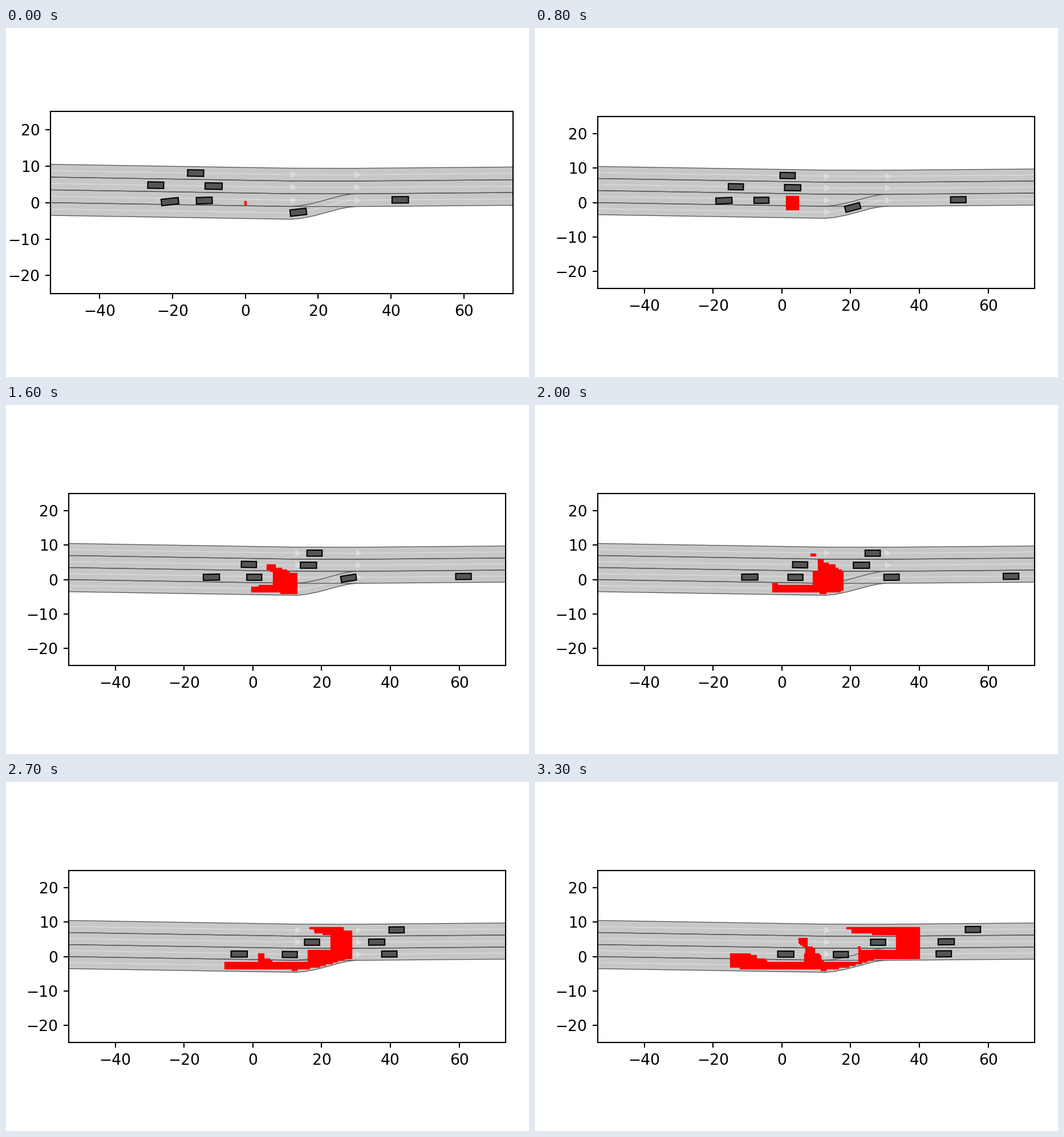
Recreate the animation shown at these times as a matplotlib script. Size 917 px wide and 611 px high, loop 3.4 s.

```python
from itertools import product

import numpy as np
import matplotlib.pyplot as plt
from matplotlib.animation import FuncAnimation
from matplotlib.collections import PolyCollection
from matplotlib.patches import Polygon

W, H, DPI = 917, 611, 128
FRAMES, INTERVAL = 34, 100
PX = 72 / DPI  # one pixel in points

plt.rcParams.update({
    "font.family": "DejaVu Sans", "font.size": 26.5 * PX,
    "axes.linewidth": 2.12 * PX,
    **{f"{a}tick.major.{p}": v * PX for a in "xy"
       for p, v in (("size", 9.28), ("pad", 9.28), ("width", 2.12))},
})

ROAD, EDGE, CENTER = "#c7c7c7", "#555555", "#dddddd"
LANE = 3.5

# Upper bound of the road, and lower bound of the merging lane
TOP_X, TOP_Y = [-53.55, 12.4, 30.1, 73.55], [10.5, 9.44, 9.41, 9.77]
LOW_X = [-53.55, 12.4, 15.2, 18.9, 25.9, 28.2, 30.1, 73.55]
LOW_Y = [-3.5, -4.56, -4.33, -3.6, -1.72, -1.27, -1.08, -0.73]


def road_top(x):
    return np.interp(x, TOP_X, TOP_Y)


def road_low(x):
    return np.interp(x, LOW_X, LOW_Y)


fig = plt.figure(figsize=(W / DPI, H / DPI), dpi=DPI, facecolor="white")
ax = fig.add_axes([0.1, 0.1, 0.8, 0.8])


def place_axes(left, right, half, middle=305.7):
    bottom = H - middle - half
    ax.set_position([left / W, bottom / H, (right - left) / W, 2 * half / H])


def lanelet(x, upper, lower, arrow):
    mid = (upper + lower) / 2
    outline = np.r_[np.c_[x, upper], np.c_[x, lower][::-1]]
    ax.add_patch(Polygon(outline, fc=ROAD, ec="none", zorder=1))
    for y in (upper, lower):
        ax.plot(x, y, color=EDGE, lw=1.3 * PX, zorder=1.2)
    ax.plot(x, mid, color=CENTER, lw=1.3 * PX, zorder=1.1)
    if arrow:
        tip = [(x[0], mid[0] + 0.87), (x[0] + 1.75, mid[0]), (x[0], mid[0] - 0.87)]
        ax.add_patch(Polygon(tip, fc=CENTER, ec="none", zorder=1.15))


def draw_road():
    for i in range(3):
        x = np.array(TOP_X[i:i + 2])
        for n in range(4 if i == 0 else 3):
            upper = road_top(x) - n * LANE
            lanelet(x, upper, upper - LANE, i > 0)
    x = np.array(LOW_X[1:7])
    lanelet(x, road_low(x) + LANE, road_low(x), True)


class Car:
    """Drives along a lane with constant acceleration, easing to its centre."""

    def __init__(self, length, lane, start, speed, acc, offset=0):
        self.lane, self.offset = lane, offset
        self.course = acc, speed, start
        self.half = length / 2
        self.box = np.array([(-1, -1), (1, -1), (1, 1), (-1, 1)]) * (self.half, 0.88)
        self.patch = ax.add_patch(Polygon(self.box, fc=EDGE, ec="black",
                                          lw=2.1 * PX, zorder=20))

    def pos(self, k):
        x = np.polyval(self.course, k)
        if self.lane == 3:  # the merging lane
            y = road_low(x) + LANE / 2
        else:
            y = road_top(x) - (self.lane + 0.5) * LANE
        return np.array([x, y + self.offset * np.exp(-k / 18)])

    def move(self, k):
        dx, dy = self.pos(k + 2) - self.pos(k - 2)
        c, s = np.array([dx, dy]) / np.hypot(dx, dy)
        self.patch.set_xy(self.box @ [(c, s), (-s, c)] + self.pos(k))

    def blocks(self, k, x, y):
        cx, cy = self.pos(k)
        return (abs(x - cx) < self.half + 3.1) & (abs(y - cy) < 2.1)


# Reachable area: branch into full thrust or coasting on both axes,
# drop what leaves the road or meets a car, and thin out equal states
SPEED, ACC, STAGE = 0.378, 0.0251, 3
MARGIN = 0.85
THRUST = np.array(list(product((-1, 0, 1), repeat=2))).T


def thin(k, x, y, vx, vy):
    """Keep the outermost state of each position and velocity cell."""
    step = 2 * ACC * STAGE
    key = 0
    for q in (2 * x, 2 * y, (vx - SPEED) / step + 0.5, vy / step + 0.5):
        key = key * 256 + np.floor(q).astype(np.int64) + 128
    order = np.argsort(-((x - SPEED * k) ** 2 + y ** 2))
    keep = order[np.unique(key[order], return_index=True)[1]]
    return x[keep], y[keep], vx[keep], vy[keep]


def strips(x, y):
    """Merge positions into half-metre rows of rectangles."""
    row, col = np.floor(2 * y).astype(int), np.floor(4 * x).astype(int)
    central = abs(2 * y - row - 0.5) < 0.24
    row, col = row[central], col[central]
    grid = np.zeros((40, 400), bool)
    grid[row + 15, col + 120] = True
    rects = []
    for r in range(40):
        cells = np.flatnonzero(grid[r])
        if not len(cells):
            continue
        y1 = (r - 15) / 2
        for run in np.split(cells, np.flatnonzero(np.diff(cells) > 3) + 1):
            x1, x2 = (run[0] - 120) / 4, (run[-1] - 119) / 4
            rects.append([(x1, y1), (x2, y1), (x2, y1 + 0.5), (x1, y1 + 0.5)])
    return rects


def explore():
    x, y = np.array(list(product((-0.05, 0.05), (-0.15, 0.15)))).T
    vx, vy = np.full(4, SPEED), np.zeros(4)
    steps = []
    for k in range(FRAMES):
        steps.append(strips(x, y))
        if k % STAGE == 0:
            state = thin(k, x, y, vx, vy)
            ax_, ay_ = np.tile(THRUST, len(state[0])) * ACC
            x, y, vx, vy = (np.repeat(s, THRUST.shape[1]) for s in state)
        x, y = x + vx + ax_, y + vy + ay_
        vx, vy = vx + 2 * ax_, vy + 2 * ay_
        free = (y > road_low(x) + MARGIN) & (y < road_top(x) - MARGIN)
        for car in cars:
            free &= ~car.blocks(k + 1, x, y)
        x, y, vx, vy, ax_, ay_ = (s[free] for s in (x, y, vx, vy, ax_, ay_))
    return steps


draw_road()
cars = [
    Car(4.42, 0, -13.68, 1.86, 0.0072),
    Car(4.38, 1, -24.64, 1.347, 0.0075),
    Car(4.7, 1, -8.74, 1.409, 0.0092),
    Car(4.7, 2, -20.73, 0.428, 0.0071, -0.95),
    Car(4.35, 2, -11.3, 0.608, 0.0077, -0.5),
    Car(4.45, 3, 14.52, 0.686, 0.0091),
    Car(4.5, 2, 42.52, 1.025, 0.009),
]
reach = explore()
area = PolyCollection([], facecolor="red", edgecolor="red", lw=1.3 * PX, zorder=1.5)
ax.add_collection(area, autolim=False)
ax.set(xlim=(-53.55, 73.55), ylim=(-25, 25),
       xticks=range(-40, 61, 20), yticks=range(-20, 21, 10))


def update(k):
    if k == 0:
        place_axes(78, 889.3, 159.55)
    else:
        place_axes(110, 876.4, 150.7)
    for car in cars:
        car.move(k)
    area.set_verts(reach[k])
    return [area]


anim = FuncAnimation(fig, update, frames=FRAMES, interval=INTERVAL,
                     repeat=True, repeat_delay=0, blit=False)
plt.show()
```
